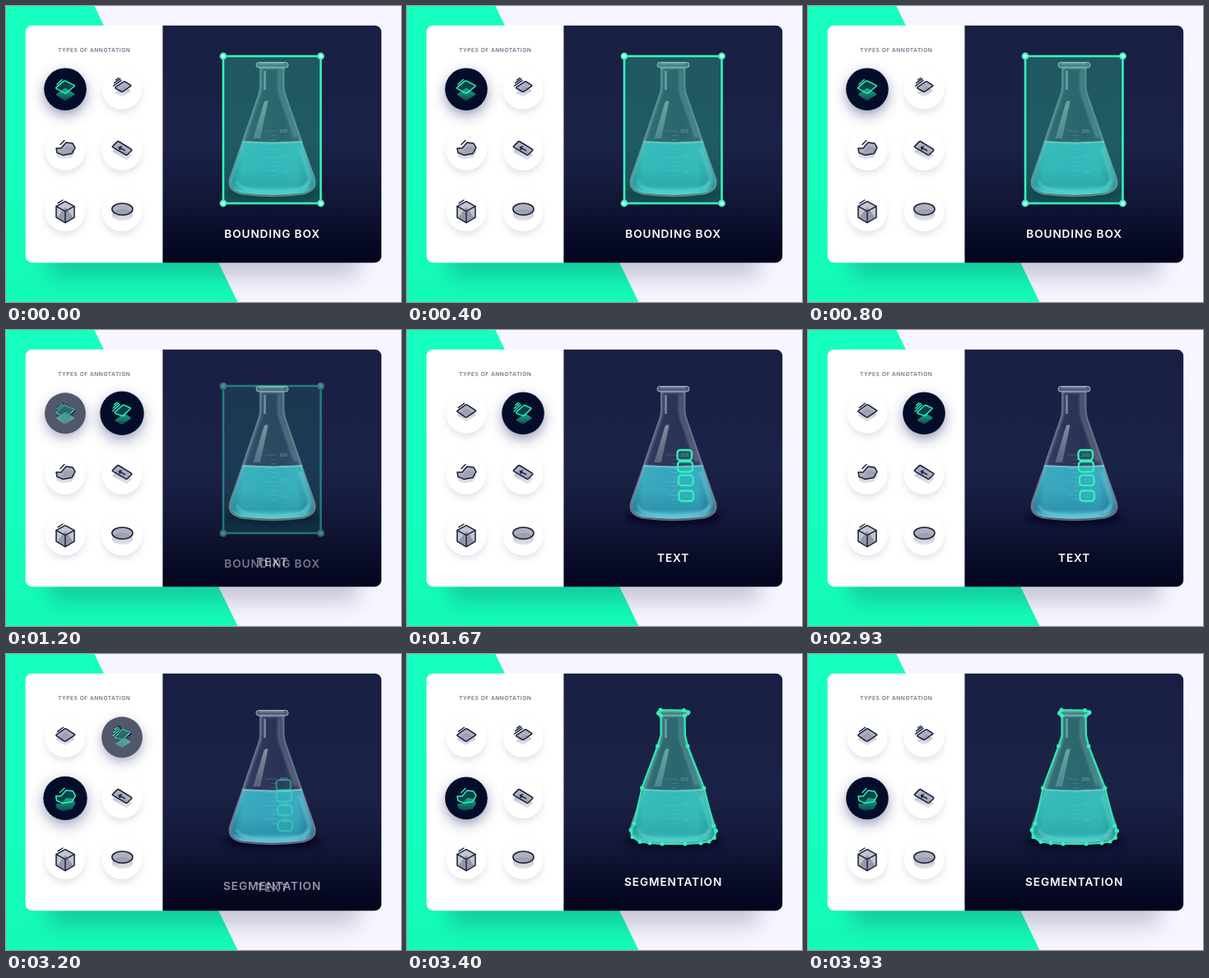
An HTML page that plays this animation: 480x360 px, repeating every 3990 ms.

```html
<!DOCTYPE html>
<html lang="en">
<head>
<meta charset="utf-8">
<title>Types of annotation</title>
<style>
  html, body { margin: 0; width: 100%; height: 100%; overflow: hidden; background: #f7f5ff; }
  svg { display: block; width: 100vw; height: 100vh; }
  text { font-family: Inter, Roboto, sans-serif; font-weight: 600; text-anchor: middle; }
</style>
</head>
<body>
<svg id="stage" viewBox="0 0 480 360"></svg>
<script>
const LOOP = 3990, FADE = 300, STARTS = [-FADE, 1100, 3100];
const GREEN = '#2bf3ba', INK = '#171e3b';
const stage = document.getElementById('stage');

const gradient = (id, stops, horizontal) =>
  `<linearGradient id="${id}" x2="${horizontal ? 1 : 0}" y2="${horizontal ? 0 : 1}">` +
  stops.map(([at, color, alpha = 1]) =>
    `<stop offset="${at}" stop-color="${color}" stop-opacity="${alpha}"/>`).join('') +
  '</linearGradient>';
const blur = (id, size) =>
  `<filter id="${id}" x="-60%" y="-60%" width="220%" height="220%"><feGaussianBlur stdDeviation="${size}"/></filter>`;
const path = (d, attrs) => `<path d="${d}" ${attrs}/>`;

const BODY = 'M308.5 74V97Q308.5 104 305.5 111L272.5 207C268 221 275 226 286 229Q324 234.5 361 229C372 226 379.5 221 374.5 207L341 111Q338 104 338 97V74Z';
const LIQUID = 'M288 165L274.5 207C270.5 219 277 224.5 287 227.3Q324 232 360 227.3C370 224.5 376.5 219 372.5 207L359.5 165Q324 169 288 165Z';

const defs = `<defs>
  ${gradient('mint', [[0, '#16ffc1'], [.6, '#12ffbe'], [1, '#14fab5']])}
  ${gradient('night', [[0, '#191f42'], [.5, '#1b2247'], [.72, '#131838'], [1, '#02041d']])}
  ${gradient('liquid', [[0, '#2b8da6'], [.14, '#3fb0c4'], [.5, '#3aabc2'], [.8, '#3fb0c5'], [.92, '#2f94ad'], [1, '#1f7d98']], true)}
  ${gradient('depth', [[0, '#0e5577', .05], [.5, '#0e5577', .1], [.82, '#0e5577', .3], [.93, '#6fcbd8', .25], [1, '#a2e6ec', .5]])}
  ${gradient('glass', [[0, '#a9bfd0', .3], [.25, '#78879f', .24], [.6, '#5a6482', .24], [1, '#a2b4c6', .3]], true)}
  ${gradient('shine', [[0, '#f2f6fa', .75], [1, '#d5dfe8', .42]])}
  ${gradient('baseGray', [[0, '#8d91a5'], [1, '#d9dbe4']])}
  ${gradient('baseGreen', [[0, '#28cf9f'], [1, '#0b5c58']])}
  ${blur('soft', 5)}${blur('glow', 8)}${blur('wide', 13)}${blur('near', 1.4)}
  <clipPath id="card"><rect x="23.7" y="23.7" width="432.5" height="288.5" rx="8"/></clipPath>
  <clipPath id="inside">${path(BODY, '')}</clipPath>
</defs>`;

const backdrop = `
  <rect width="480" height="360" fill="#f7f5ff"/>
  <path d="M0 0H107.4L281.4 360H0Z" fill="url(#mint)"/>
  <rect x="52" y="286" width="376" height="44" rx="8" fill="#16214f" opacity=".22" filter="url(#wide)"/>
  <g clip-path="url(#card)">
    <rect x="23" y="23" width="168" height="290" fill="#fff"/>
    <rect x="190.4" y="23" width="267" height="290" fill="url(#night)"/>
  </g>
  <text x="107.2" y="56.2" font-size="6.6" letter-spacing=".55" fill="#72768a">TYPES OF ANNOTATION</text>`;

// Each glyph is drawn around its button's centre.
const glyphs = [
  { top: 'M-10.5-3.4L-1-10Q0-10.7 1.2-10L11.2-3.6Q12-3 11.2-2.3L.8 4.6Q-.3 5.3-1.4 4.6L-10.5-1.6Q-11.8-2.5-10.5-3.4Z',
    marks: 'M-9.5-6.8L-2.5-12', drop: 5, tilt: -6 },
  { top: 'M-7.6-2.8L1.8-9Q2.8-9.7 3.9-9L10.2-5Q11.2-4.3 10.2-3.5L1.2 2.8Q.2 3.5-1 2.8L-7.6-.8Q-9-1.8-7.6-2.8Z',
    marks: 'M-10.5-4L-1-10.5M-9.5-7.5L-2-12.5M-7.5-11.2L-4-13.5', drop: 6, tilt: -9 },
  { top: 'M-11-2.5L-5-2.5L1-9.3L9-8.3L12-3L8 4L-3 6L-10 3Z',
    marks: 'M-6-7L-1-11.8', drop: 5, tilt: 0 },
  { top: 'M-11.3-5L-6-10.3Q-5-11.2-3.7-10.4L11.2-1.2Q12.3-.4 11.4 .6L6.5 5.3Q5.5 6.2 4.2 5.4L-11.1-3.5Q-12.2-4.2-11.3-5Z',
    marks: 'M3.5 .3L-3.5-3.6M-2.6-.8L-3.5-3.6L-.5-4.6', drop: 6, tilt: 0 },
  { top: 'M0-12L11-6V7.5L0 14L-11 7.5V-6Z', marks: 'M-11-6L0 0L11-6M0 0V14M-9-9.8L-3-13.6', cube: true },
  { top: 'M-12.2-2.5A12.6 7.2 0 0 1 13-2.5A12.6 7.2 0 0 1-12.2-2.5Z', marks: '', drop: 7 }
];

function glyph({ top, marks, drop, tilt, cube }, active) {
  const color = active ? GREEN : INK;
  const base = cube
    ? path('M0-5L9.5 7.5L0 13L-9.5 7.5Z', 'fill="#686d85" opacity=".7"')
    : path(top, `transform="translate(0 ${active ? drop + 4 : drop})" fill="url(#${active ? 'baseGreen' : 'baseGray'})" opacity="${active ? .8 : .65}"`);
  const lid =
    path(top, `fill="${active ? '#15a786' : '#9195a8'}" fill-opacity="${active ? .35 : cube ? .55 : .75}" stroke="${color}" stroke-width="1.5" stroke-linejoin="round"`) +
    path(marks, `fill="none" stroke="${color}" stroke-width="1.4" stroke-linecap="round" stroke-linejoin="round"`);
  return base + `<g transform="rotate(${active ? tilt : 0})">${lid}</g>`;
}

const buttons = glyphs.map((shape, i) => {
  const x = i % 2 ? 141 : 72, y = 101.2 + 74.2 * Math.floor(i / 2);
  const active = i < 3 ? `<g class="active">
      <circle cy="6" r="27" fill="#2a3468" opacity=".36" filter="url(#glow)"/>
      <circle r="25.8" fill="#030d29"/>${glyph(shape, true)}</g>` : '';
  return `<g transform="translate(${x} ${y})">
    <circle cy="5" r="23" fill="#555d83" opacity=".2" filter="url(#soft)"/>
    <circle r="24.5" fill="#fff"/>${glyph(shape, false)}${active}</g>`;
}).join('');

const scale = Array.from({ length: 11 }, (_, i) => {
  const y = 152 + i * 5.4, long = i % 3 === 0;
  return `M${long ? 315 : 322} ${y}H329`;
}).join('');
const numbers = [[337, 154, 250], [337.5, 168, 200], [338.5, 185, 150], [339, 204, 100]]
  .map(([x, y, n], i) => `<text x="${x}" y="${y}" font-size="5" fill="#a9dbe5" opacity="${i ? .25 : .5}">${n}</text>`).join('');

const flask = `
  <ellipse cx="324" cy="228" rx="59" ry="8" fill="#03061d" opacity=".85" filter="url(#soft)"/>
  ${path(BODY, 'fill="url(#glass)"')}
  ${path(LIQUID, 'fill="url(#liquid)"')}${path(LIQUID, 'fill="url(#depth)"')}
  <g clip-path="url(#inside)">
    ${path(BODY, 'fill="none" stroke="#b9c8d4" stroke-width="5" opacity=".42" filter="url(#near)"')}
    <path d="M332 78V100Q333 108 337 117L352 160" fill="none" stroke="#cbd6df" stroke-width="4" opacity=".28" filter="url(#near)"/>
    <path d="M357 172L369 208Q370 218 360 223" fill="none" stroke="#7fd6e0" stroke-width="5" opacity=".45" filter="url(#near)"/>
    <path d="M280 213Q284 222 298 224Q324 227 350 224Q364 222 368 213" fill="none" stroke="#9ce4ea" stroke-width="2.5" opacity=".45" filter="url(#near)"/>
  </g>
  ${path(BODY, 'fill="none" stroke="#93a3b4" stroke-opacity=".55" stroke-width=".8"')}
  <path d="M287.5 165Q324 167.8 360 165" fill="none" stroke="#86cbd6" stroke-width="2" opacity=".85"/>
  <path d="M313.5 117Q315.5 114 318.5 116L309 161H300.5Z" fill="url(#shine)" opacity=".6"/>
  <path d="M314.5 79V102" stroke="#eef4f8" stroke-width="2.6" opacity=".42"/>
  <rect x="304" y="68.5" width="39" height="6.5" rx="3.2" fill="#68778c" fill-opacity=".7" stroke="#a9b7c4" stroke-width="1"/>
  <path d="M308 70H338" stroke="#e4edf2" opacity=".5"/>
  ${path(scale, 'stroke="#b4e4e9" stroke-width=".7" opacity=".28"')}${numbers}`;

const corners = [[264, 61], [382.5, 61], [264, 240], [382.5, 240]].map(([x, y]) =>
  `<circle cx="${x}" cy="${y}" r="4.4" fill="#45efbd"/><circle cx="${x}" cy="${y}" r="2.3" fill="#c8fff0"/>`).join('');
const boundingBox = `<rect x="264" y="61" width="118.5" height="179" fill="#2de8b0" fill-opacity=".28" stroke="#37f2bd" stroke-width="2.6"/>${corners}`;

const textBoxes = [[328.5, 146, 17.5], [329, 160, 18], [330, 176.7, 17.5], [330.5, 195.5, 17.5]].map(([x, y, width]) =>
  `<rect x="${x}" y="${y}" width="${width}" height="12.5" rx="3.5" fill="#1fd6a5" fill-opacity=".18" stroke="#2df3bd" stroke-width="2.3"/>`).join('');

const outline = [
  [308, 68], [336.5, 68.5], [342, 71], [337.5, 75], [338, 99], [341, 112], [361, 163], [372.5, 209],
  [375.5, 215], [373.5, 223.5], [367, 228], [357, 230], [338, 231], [310, 231], [295, 230], [283, 228.5],
  [274, 222.5], [272, 214], [276, 206], [285.5, 163], [304.5, 112], [308.5, 99], [308.5, 75], [305.5, 72]
];
const plain = [4, 21];
const segmentation =
  path('M' + outline.join('L') + 'Z', 'fill="#2de8b0" fill-opacity=".29" stroke="#27edb4" stroke-width="2.2" stroke-linejoin="round"') +
  outline.filter((_, i) => !plain.includes(i))
    .map(([x, y]) => `<circle cx="${x}" cy="${y}" r="2.5" fill="#35f1ba"/>`).join('');

const group = (name, items) => items.map(item => `<g class="${name}">${item}</g>`).join('');
const labels = ['BOUNDING BOX', 'TEXT', 'SEGMENTATION'].map(label =>
  `<text x="323.6" y="282" font-size="13.6" letter-spacing=".9" fill="#fff">${label}</text>`);

stage.innerHTML = defs + backdrop + buttons + flask +
  group('mark', [boundingBox, textBoxes, segmentation]) + group('label', labels);

const [actives, marks, captions] = ['.active', '.mark', '.label'].map(s => [...stage.querySelectorAll(s)]);
const clamp = v => Math.max(0, Math.min(1, v));
const easeOut = v => 1 - (1 - clamp(v)) ** 2;

function show(node, alpha, transform) {
  node.setAttribute('opacity', alpha);
  node.setAttribute('transform', transform);
  node.style.display = alpha > 0 ? '' : 'none';
}

function render(t) {
  STARTS.forEach((start, i) => {
    const age = (t - start) / FADE;
    const enter = easeOut(age);
    const leave = i < 2 ? easeOut((t - STARTS[i + 1]) / FADE) : 0;
    const late = easeOut((age - .4) / .6);
    const pop = clamp(enter * 2) * .2 + .8 + .04 * Math.sin(Math.PI * clamp(age));
    show(actives[i], clamp(enter * 2) * (1 - leave ** 2), `scale(${pop * (1 - .06 * leave)})`);
    show(marks[i], late * (1 - leave), `translate(0 ${12 * (1 - late) + 12.6 * leave})`);
    show(captions[i], enter * (1 - leave), `translate(0 ${12 * (1 - enter) + 12.6 * leave})`);
  });
}

const origin = performance.now();
function frame() {
  render((performance.now() - origin) % LOOP);
  requestAnimationFrame(frame);
}
render(0);
requestAnimationFrame(frame);
</script>
</body>
</html>
```
